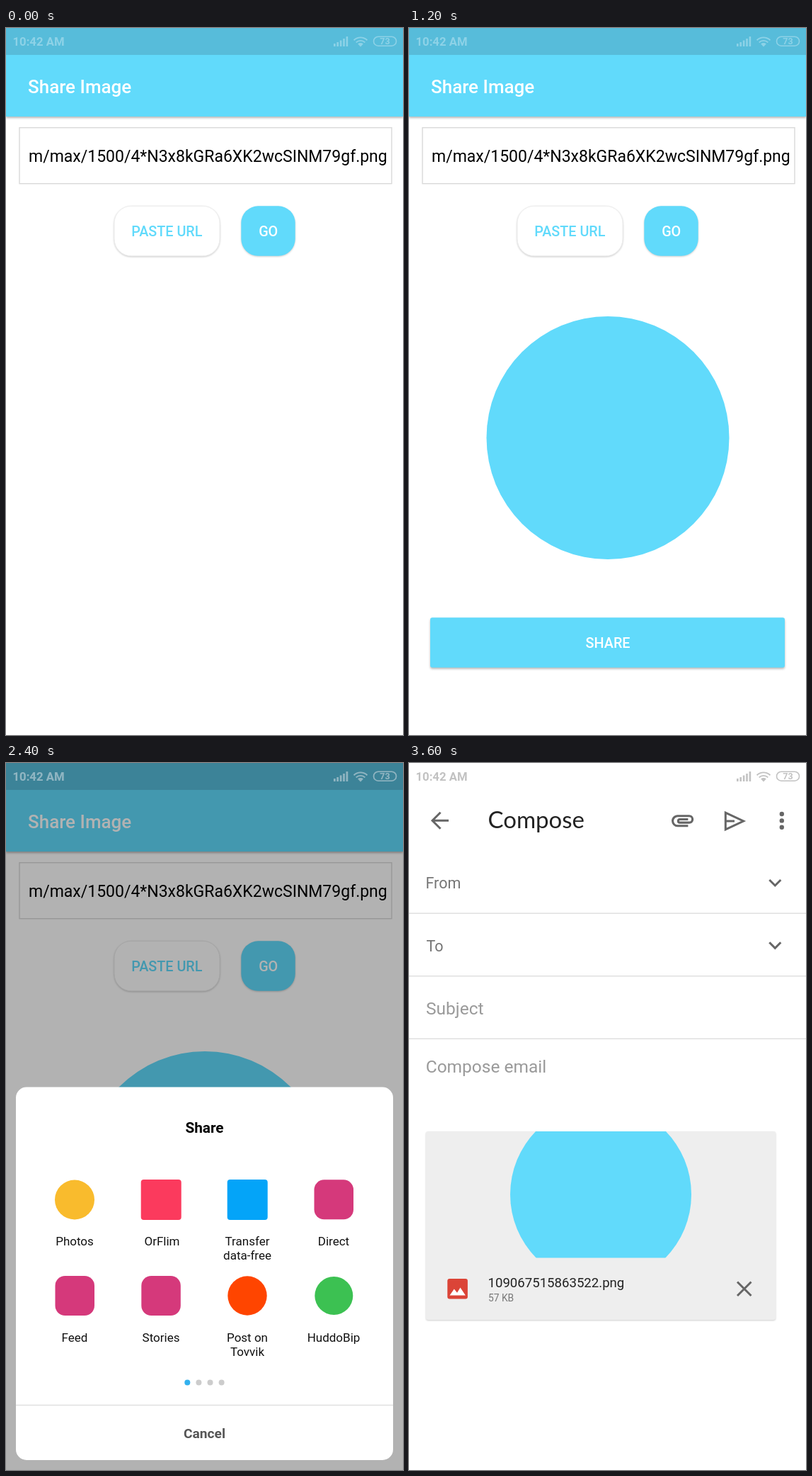
Recreate the animation shown at these times as an HTML page. Size 561 by 998 pixels, loop 4800 ms.

```html
<!DOCTYPE html>
<html lang="en">
<head>
<meta charset="utf-8">
<title>Share an image</title>
<style>
  html, body { margin: 0; width: 100%; height: 100%; overflow: hidden; background: #fff; }
  svg { display: block; width: 561px; height: 998px; font-family: Roboto, sans-serif; }
  .mid { text-anchor: middle; }
  .medium { font-weight: 500; }
  .bold { font-weight: 700; }
  .white { fill: #fff; }
  .sky { fill: #61dafb; }
  .button { font-size: 19.8px; font-weight: 500; text-anchor: middle; }
  .label { font-size: 17px; text-anchor: middle; fill: #111; }
  .field { font-size: 21.5px; fill: #757575; }
  .hint { font-size: 24.5px; fill: #9a9a9a; }
  .rule { stroke: #e0e0e0; stroke-width: 1.5; }
  .line { fill: none; stroke: #666; stroke-width: 3; }
  .raised { filter: drop-shadow(0 2px 1.5px rgba(0, 0, 0, .28)); }
  .soft { filter: drop-shadow(0 1.5px 1px rgba(0, 0, 0, .2)); }

  /* Each screen appears at its step and stays until the loop restarts. */
  .result, .sheet, .compose { animation: 4800ms step-end infinite; }
  .result { animation-name: show-result; }
  .sheet { animation-name: show-sheet; }
  .compose { animation-name: show-compose; }
  @keyframes show-result { 0% { opacity: 0 } 25%, 100% { opacity: 1 } }
  @keyframes show-sheet { 0% { opacity: 0 } 50%, 100% { opacity: 1 } }
  @keyframes show-compose { 0% { opacity: 0 } 75%, 100% { opacity: 1 } }
</style>
</head>
<body>
<svg viewBox="0 0 561 998">
  <defs>
    <g id="status" fill="currentColor">
      <text class="bold" x="9.5" y="25" font-size="16.7">10:42 AM</text>
      <path d="M463 22h2.6v4h-2.6zM467.4 20h2.6v6h-2.6zM471.8 17.5h2.6v8.5h-2.6zM476.2 15h2.6v11h-2.6zM480.6 12h2.6v14h-2.6z"/>
      <g fill="none" stroke="currentColor" stroke-width="1.9">
        <path d="M491.6 17.2a13.5 13.5 0 0 1 18.8 0M494.7 20.4a9 9 0 0 1 12.6 0"/>
        <rect x="519.5" y="12.2" width="32" height="13" rx="6.5" stroke-width="1.6"/>
      </g>
      <path d="M497.2 22.6a5.6 5.6 0 0 1 7.6 0L501 26.4z"/>
      <text class="bold mid" x="535.5" y="23.2" font-size="12.5">73</text>
    </g>
    <path id="chevron" class="line" d="M-8-4L0 4L8-4"/>
    <clipPath id="preview"><rect x="24" y="520" width="494" height="178.5"/></clipPath>
  </defs>

  <g>
    <rect class="white" width="561" height="998"/>
    <rect class="sky raised" y="0" width="561" height="125"/>
    <rect width="561" height="38" fill="#57bcda"/>
    <use href="#status" color="#8dd2e7"/>
    <text class="white medium" x="31" y="92" font-size="26">Share Image</text>

    <rect x="19" y="140.7" width="526" height="79" fill="#fff" stroke="#d9d9d9" stroke-width="1.4"/>
    <text x="32" y="189" font-size="23">m/max/1500/4*N3x8kGRa6XK2wcSINM79gf.png</text>

    <rect class="soft" x="153" y="251.3" width="149" height="70.5" rx="24" fill="#fff" stroke="#ececec"/>
    <text class="button sky" x="227.3" y="294.3">PASTE URL</text>
    <rect class="sky soft" x="332.3" y="251.3" width="76.4" height="70.5" rx="24"/>
    <text class="button white" x="370.7" y="294.3">GO</text>
  </g>

  <g class="result">
    <circle class="sky" cx="281" cy="578.5" r="171.5"/>
    <rect class="sky raised" x="30" y="832.3" width="501" height="70.4" rx="3"/>
    <text class="button white" x="281" y="875.2">SHARE</text>
  </g>

  <g class="sheet">
    <rect width="561" height="998" opacity=".3"/>
    <use href="#status" color="#8fb5c2"/>
    <rect class="white" x="14" y="457.5" width="533" height="526.5" rx="15"/>
    <text class="bold mid" x="280.5" y="522" font-size="20.8">Share</text>

    <circle cx="97" cy="616.5" r="28" fill="#f9bb2d"/>
    <rect x="190.7" y="588" width="57" height="57" rx="4" fill="#fb3a5d"/>
    <rect x="312.7" y="588" width="57" height="57" rx="4" fill="#04a4f8"/>
    <g fill="#d5397b">
      <rect x="435.5" y="588.3" width="55.5" height="56" rx="14"/>
      <rect x="69.5" y="724" width="55.5" height="56" rx="14"/>
      <rect x="191.3" y="724" width="55.5" height="56" rx="14"/>
    </g>
    <circle cx="341" cy="752" r="27.7" fill="#ff4500"/>
    <circle cx="463.3" cy="752" r="27" fill="#3cc152"/>

    <g class="label">
      <text x="97" y="681">Photos</text>
      <text x="220.5" y="681">OrFlim</text>
      <text x="341" y="681">Transfer<tspan x="341" dy="20">data-free</tspan></text>
      <text x="463" y="681">Direct</text>
      <text x="97" y="817">Feed</text>
      <text x="219" y="817">Stories</text>
      <text x="341" y="817">Post on<tspan x="341" dy="20">Tovvik</tspan></text>
      <text x="463" y="817">HuddoBip</text>
    </g>

    <g fill="#ccc">
      <circle cx="256.3" cy="874.5" r="4" fill="#33b1ee"/>
      <circle cx="272.4" cy="874.5" r="4"/>
      <circle cx="288.5" cy="874.5" r="4"/>
      <circle cx="304.6" cy="874.5" r="4"/>
    </g>
    <path class="rule" d="M14 906.5H547"/>
    <text class="bold mid" x="280.5" y="952.5" font-size="19.2" fill="#555">Cancel</text>
  </g>

  <g class="compose">
    <rect class="white" width="561" height="998"/>
    <use href="#status" color="#c2c2c2"/>
    <path class="line" d="M56 81.3H33M44.5 69.8L33 81.3L44.5 92.8"/>
    <text x="111.5" y="92.3" font-size="33" fill="#222" style="font-family:Lato,sans-serif">Compose</text>
    <path transform="translate(367.9 62.3) scale(1.558)" fill="#666"
      d="M2 12.5C2 9.46 4.46 7 7.5 7H18c2.2 0 4 1.8 4 4s-1.8 4-4 4H9.5a2.5 2.5 0 0 1 0-5H17v2H9.4c-.55 0-.55 1 0 1H18a2 2 0 0 0 0-4H7.5a3.5 3.5 0 0 0 0 7H17v2H7.5A5.5 5.5 0 0 1 2 12.5z"/>
    <path class="line" d="M447.3 70.2V93.8L472.6 82ZM447.3 82H460"/>
    <g fill="#666">
      <circle cx="526.8" cy="72" r="3.2"/>
      <circle cx="526.8" cy="81.4" r="3.2"/>
      <circle cx="526.8" cy="90.8" r="3.2"/>
    </g>

    <text class="field" x="23.5" y="177">From</text>
    <text class="field" x="24.5" y="265.5">To</text>
    <use href="#chevron" x="517.3" y="169"/>
    <use href="#chevron" x="517.3" y="257.3"/>
    <text class="hint" x="24" y="354.8">Subject</text>
    <text class="hint" x="23.7" y="436.8">Compose email</text>
    <path class="rule" d="M0 212.3H561M0 300.8H561M0 389.3H561"/>

    <rect class="soft" x="24" y="520" width="494" height="266" rx="3" fill="#eee"/>
    <circle class="sky" cx="271" cy="609" r="128" clip-path="url(#preview)"/>
    <rect x="54.3" y="728" width="28.6" height="28.6" rx="3" fill="#db4437"/>
    <path class="white" d="M57.5 751.5L63.8 742.5L68 747.8L72.5 740.5L79.8 751.5Z"/>
    <text x="111.5" y="740.3" font-size="18.6" fill="#222">109067515863522.png</text>
    <text x="112" y="760" font-size="13.8" fill="#777">57 KB</text>
    <path class="line" d="M464 732.5L483.5 752M483.5 732.5L464 752"/>
  </g>
</svg>
</body>
</html>
```
